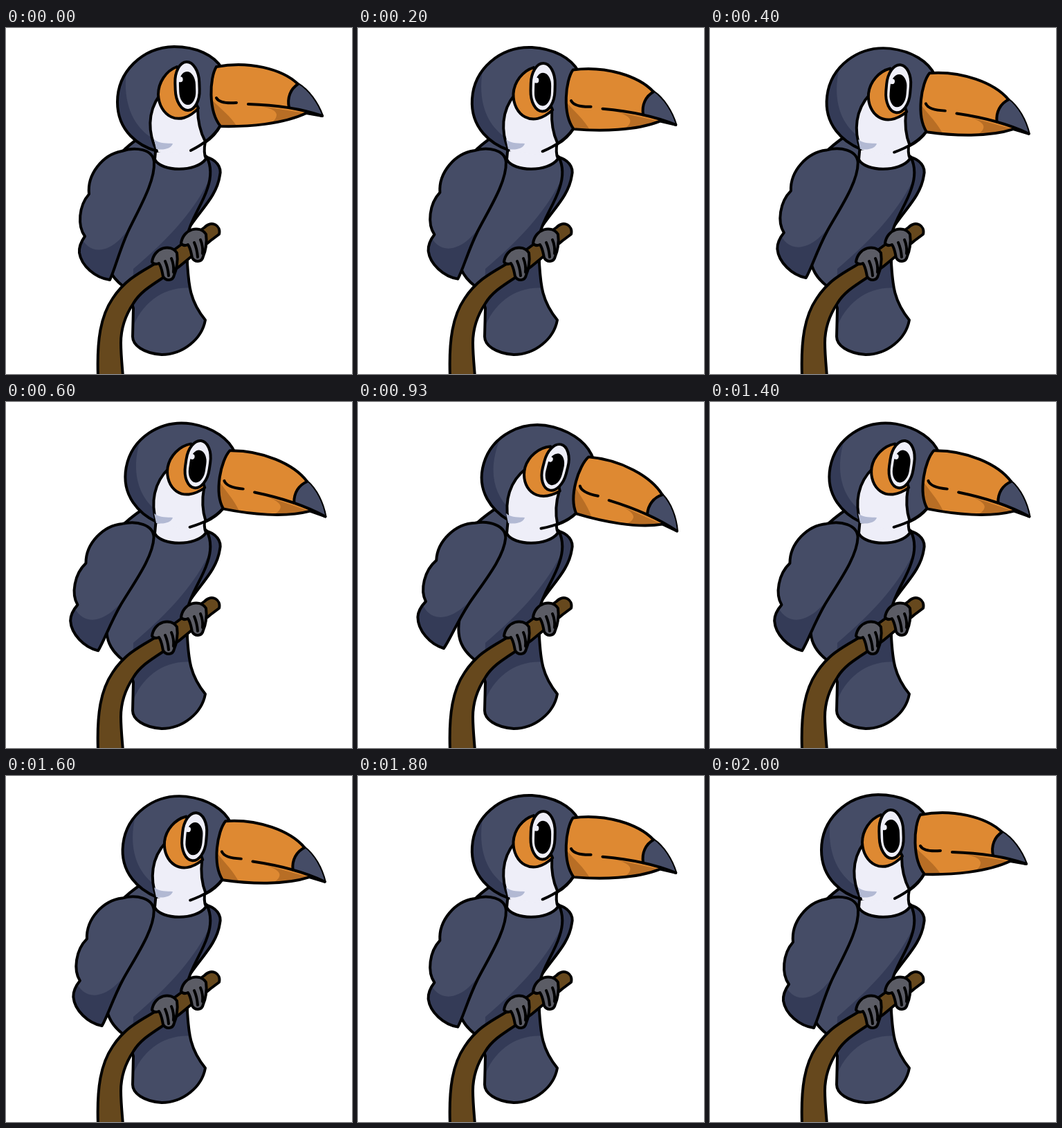
An HTML page for the animation above (2070 ms loop, 500x500 px).

```html
<!DOCTYPE html>
<html lang="en">
<head>
<meta charset="utf-8">
<title>Toucan on a branch</title>
<style>
  html, body { margin: 0; height: 100%; overflow: hidden; background: #fff; }
  svg { display: block; width: 100vw; height: 100vh; }
  .line { fill: none; stroke: #000; stroke-width: 4; stroke-linecap: round; stroke-linejoin: round; }
</style>
</head>
<body>
<svg id="stage" viewBox="0 0 500 500"></svg>
<script>
const BLUE = '#454c66', NAVY = '#343b57', ORANGE = '#de8932', RUST = '#b86e25', WHITE = '#eeeef8';
let clips = 0;

const fill = (d, color) => `<path d="${d}" fill="${color}"/>`;
const line = d => `<path class="line" d="${d}"/>`;

// Filled outline with a shadow clipped to its inside
function part(d, color, shade = '', dark = NAVY) {
  const id = 'clip' + clips++;
  return `<clipPath id="${id}"><path d="${d}"/></clipPath>` + fill(d, color) +
    `<g clip-path="url(#${id})">${fill(shade, dark)}</g>` + line(d);
}

const farWing = part('M288 186C304 190 312 201 309 213C305 242 282 262 265 288Z', NAVY);

const body = part(
  'M168 179Q176 170 196 156L240 150L290 186C297 200 297 215 291 232C283 257 267 276 262 300L262 340' +
  'C264 370 265 394 288 422C283 450 255 472 225 472C198 470 183 458 183 446L184 405' +
  'C182 396 178 384 169 373C150 358 143 342 146 318Z', BLUE,
  'M296 214C274 262 238 302 184 348L182 436C196 396 230 372 270 376L300 300Z');

const branch = part(
  'M133 504C131 450 137 416 154 391C172 363 196 352 218 339L287 288C298 277 311 286 308 298' +
  'L296 307L250 345C222 366 197 376 184 398C172 416 166 436 166 455C166 472 168 490 169 504Z', '#66481d');

const foot = part(
  'M211 338C214 317 238 311 247 325C249 337 246 350 243 357C241 366 231 366 227 359' +
  'C225 350 225 346 221 340Q214 343 211 338Z', '#5b5c65') +
  line('M230 337Q234 346 235 358M239 333Q243 342 242 353');

const wing = part(
  'M167 178C187 171 212 175 214 193C216 222 191 263 176 295C163 324 157 350 150 364' +
  'C129 361 109 344 106 325C105 315 109 308 114 301C103 286 105 257 120 240' +
  'C117 211 140 183 167 178Z', BLUE,
  'M106 298C118 326 142 327 164 306C183 287 196 262 204 240L190 300L150 375L95 340Z');

const throat = 'M217 168L215 190C224 208 275 209 289 189Q285 180 288 164';

const skull = part(
  'M218 178C193 171 161 150 161 107C161 64 196 28 243 27C275 27 300 39 312 58' +
  'L310 141C304 152 297 159 288 165Z', BLUE,
  'M174 62C168 112 186 146 216 162L222 182L150 170L150 62Z');

const face =
  fill('M222 98C204 122 205 152 218 179L267 183L268 177L288 165C281 151 277 136 277 116Z', WHITE) +
  line('M222 97C204 122 205 152 218 178') +
  line('M277 116C277 136 281 151 288 164') +
  line('M309 142C302 154 291 165 267 177');

const eye =
  part('M247 56C231 62 220 79 220 96C221 126 250 146 278 116Z', ORANGE) +
  `<g transform="rotate(-2 262 84)">
    <rect class="line" x="244.5" y="49" width="35" height="70" rx="17.5" ry="30" style="fill:${WHITE}"/>
    <rect x="250" y="63" width="24" height="48" rx="12" ry="19"/>
    <circle cx="252" cy="74" r="4" fill="${WHITE}"/>
  </g>`;

const beak = part(
  'M304 56C294 72 292 120 310 142C350 143 400 139 434 123L457 127C450 108 437 90 422 81' +
  'C399 59 350 47 304 56Z', ORANGE,
  'M290 96C308 116 327 128 337 148L306 146ZM350 110C370 113 390 116 391 125C391 132 385 137 374 142L457 127Z', RUST) +
  fill('M422 81C411 88 406 101 409 115L457 127C450 108 437 90 422 81Z', BLUE) +
  line('M422 81C411 88 406 101 409 115') +
  line('M350 110C385 111 425 116 457 127') +
  line('M304 101Q309 110 333 108');

stage.innerHTML = farWing + body + branch +
  `<g id="foot">${foot}</g><use href="#foot" x="42" y="-27"/>` +
  `<g id="wing">${wing}</g>` +
  fill(throat, WHITE) + line(throat) +
  `<g id="head">${skull}${face}${eye}${beak}</g>` +
  fill('M214 161C223 168 233 166 241 167C239 174 228 177 217 175Z', '#b2b9d3');

const headGroup = document.getElementById('head');
const wingGroup = document.getElementById('wing');

function draw(now) {
  // 15 steps down, 15 steps back, then a short hold
  const step = Math.min(30, Math.floor((now % 2070 + 4) * 15 / 1000));
  const k = 1 - Math.abs(step - 15) / 15;
  // The head sinks slightly as it nods
  headGroup.setAttribute('transform',
    `translate(244 171) scale(1 ${1 - 0.03 * k}) rotate(${17 * k}) translate(-244 -171)`);
  wingGroup.setAttribute('transform', `rotate(${9.4 * k} 189 190)`);
  requestAnimationFrame(draw);
}
draw(0);
</script>
</body>
</html>
```
